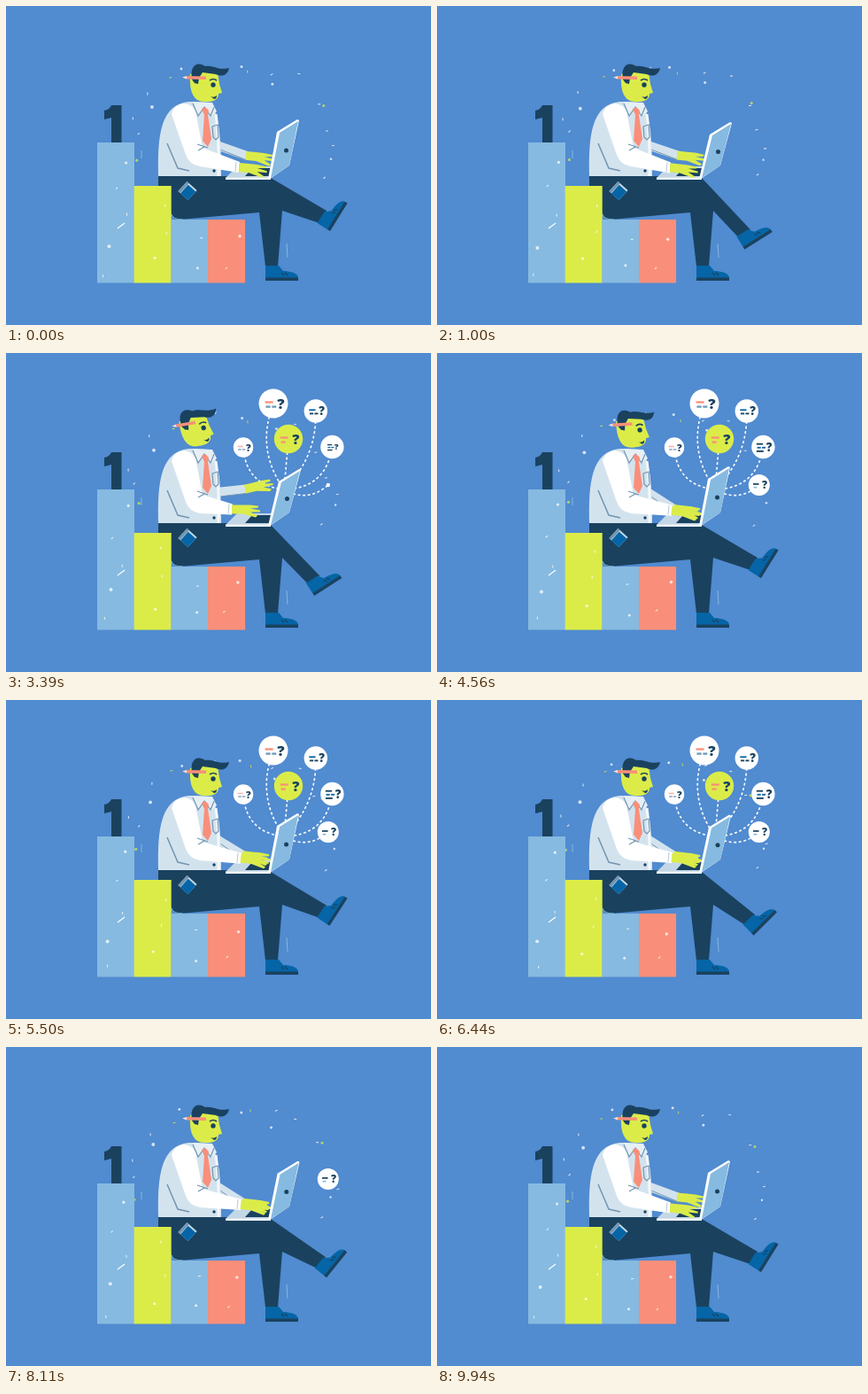
These frames come from a looping animation (480 px wide and 360 px high, 9990 ms). An HTML page with a canvas:

```html
<!DOCTYPE html>
<html>
<head>
<meta charset="utf-8">
<style>
html, body { margin: 0; width: 100%; height: 100%; overflow: hidden; background: #518bd0 }
canvas { display: block }
</style>
</head>
<body>
<canvas id="stage" width="480" height="360"></canvas>
<script>
const g = document.getElementById('stage').getContext('2d');
const LOOP = 9.99, TAU = Math.PI * 2;
const BG = '#518bd0', NAVY = '#1a425f', SKY = '#86bae0', LIME = '#dbec49', CORAL = '#f98f7a',
  SHIRT = '#d3e3ee', SHOE = '#0565a6', FOLD = '#7395b0', WHITE = '#fff';

const clamp = v => Math.max(0, Math.min(1, v));
const mix = (a, b, p) => a + (b - a) * p;
const ease = p => p * p * (3 - 2 * p);
const span = (t, start, length) => clamp((t - start) / length);
const pulse = (t, on, off, length) => ease(span(t, on, length)) - ease(span(t, off, length));
const backOut = p => 1 + 2.7 * (p - 1) ** 3 + 1.7 * (p - 1) ** 2;
const noise = n => (Math.sin(n * 127.1 + 3) * 43758.5 % 1 + 1) % 1;

function fill(d, color) {
  g.fillStyle = color;
  g.fill(new Path2D(d));
}
function stroke(d, color, width) {
  g.strokeStyle = color;
  g.lineWidth = width;
  g.stroke(new Path2D(d));
}
function disc(x, y, r, color) {
  g.fillStyle = color;
  g.beginPath();
  g.arc(x, y, r, 0, TAU);
  g.fill();
}
function rect(x, y, w, h, color) {
  g.fillStyle = color;
  g.fillRect(x, y, w, h);
}
function placed(x, y, degrees, draw, scale = 1) {
  g.save();
  g.translate(x, y);
  g.rotate(degrees * Math.PI / 180);
  g.scale(scale, scale);
  draw();
  g.restore();
}

const HUB = { x: 314, y: 154 };
const bubbles = [
  { x: 268, y: 106.5, r: 11.2, bend: -.42, top: '#f5b5a8', low: '#86a8c8' },
  { x: 302, y: 57, r: 16.5, bend: -.27, top: CORAL, low: '#6c9cba' },
  { x: 319, y: 97, r: 16.2, bend: 0, top: CORAL, low: CORAL, back: LIME, single: true },
  { x: 349.8, y: 65.5, r: 13.2, bend: .22, top: SHOE, low: NAVY },
  { x: 368.4, y: 106, r: 13.2, bend: .42, top: NAVY, low: SHOE, third: true },
  { x: 363.8, y: 149, r: 12, bend: .36, top: NAVY, low: SKY, single: true },
];

function bubbleContent({ r, top, low, single, third }) {
  const h = r * .14, lift = third ? -.16 : 0;
  const bar = (x, y, w, c) => rect(x * r, y * r - h / 2, w * r, h, c);
  bar(-.57, -.09 + lift, .55, top);
  bar(-.52, .22 + lift, .32, low);
  if (!single) bar(-.1, .22 + lift, .3, low);
  if (third) bar(-.57, .37, .6, top);
  g.fillStyle = NAVY;
  g.font = `800 ${r}px "Open Sans", "Noto Sans", sans-serif`;
  g.textAlign = 'center';
  g.fillText('?', r * .51, r * .36);
}

// Each line grows out of the laptop, pops its bubble, and both leave again in the same order
function drawBubble(b, i, t) {
  const start = 1.55 + .28 * i, leave = 6.94 + .2 * i;
  const reach = ease(span(t, start, .42)) * (1 - span(t, leave, .18));
  if (reach > 0) {
    const cx = mix(HUB.x, b.x, .5) - (b.y - HUB.y) * b.bend;
    const cy = mix(HUB.y, b.y, .5) + (b.x - HUB.x) * b.bend;
    const mx = mix(HUB.x, cx, reach), my = mix(HUB.y, cy, reach);
    const ex = mix(mx, mix(cx, b.x, reach), reach), ey = mix(my, mix(cy, b.y, reach), reach);
    g.setLineDash([3, 2.6]);
    stroke(`M${HUB.x},${HUB.y}Q${mx},${my} ${ex},${ey}`, WHITE, 1.6);
    g.setLineDash([]);
    if (reach > .9 && t < start + .6) disc(ex, ey, 2.2, WHITE);
  }
  const exit = span(t, leave + .18, .16);
  const size = backOut(span(t, start + .44, .25)) * (1 + .8 * exit - 1.8 * exit * exit);
  if (t < start + .44 || size <= 0) return;
  placed(b.x, b.y, 0, () => {
    disc(0, 0, b.r, b.back || WHITE);
    const content = span(t, start + .68, .2);
    if (content) placed(0, 0, 0, () => bubbleContent(b), backOut(content));
  }, size);
}

function drawShoe() {
  fill('M0,-17H15L20,-11Q37,-10 37,-3H0Z', SHOE);
  fill('M0,-3.5H37V0H0Z', NAVY);
  stroke('M18,-9L21,-6M22,-9L25,-6', NAVY, 1.2);
}

function drawLegs(angle) {
  fill('M172,192H298L312,231L307,294H293L286,233L196,241Q187,241 186,232L172,206Z', NAVY);
  const a = angle * Math.PI / 180, px = 312, py = 224;
  const turn = (x, y) => [
    px + (x - px) * Math.cos(a) - (y - py) * Math.sin(a),
    py + (x - px) * Math.sin(a) + (y - py) * Math.cos(a)];
  fill(`M280,194H299L${turn(362, 231)}L${turn(354, 245)}L312,231L286,233Z`, NAVY);
  placed(...turn(366, 254), angle - 58, drawShoe);
  placed(293, 310, 0, drawShoe);
  stroke('M187,235Q188,241 200,241', SKY, 1);
  placed(205, 208.5, 42, () => {
    rect(-7.5, -7.5, 15, 15, '#c6d8e5');
    rect(-4, -5.5, 11.5, 13, SHOE);
    rect(-7.5, -7.5, 3, 15, FOLD);
  });
}

function drawHand(x, y, angle) {
  placed(x, y, angle, () =>
    fill('M-1,-5L10,-5L19,-5L29,-4V-2L20,-1L31,1V3L20,3L28,7L26,9L11,5L-1,5Z', LIME));
}

function drawTorso() {
  fill('M172,192C171,150 173,108 210,108L229,109C241,118 243,150 243,192Z', SHIRT);
  stroke('M237,122Q241,150 240,192', '#f4f8fb', 3);
  fill('M211,108L233,109L238,119L231,125L224,115L216,124Z', '#e6eff5');
  stroke('M211,110L217,124L224,114L231,124L235,114', FOLD, 1.2);
  fill('M221,116L225,114L229,118L228,123L232,150L228,159L222,152L224,123Z', CORAL);
  stroke('M233,136L239,134L240,148L237,151L234,148Z', FOLD, 1.2);
  disc(235, 168, 1.7, NAVY);
  disc(235, 186, 1.7, NAVY);
}

function drawNearArm(x, y, angle) {
  fill(`M187,122C190,108 208,106 214,119L222,160L${x},${y - 6}L${x - 1},${y + 6}L219,181Q207,179 203,168Z`, WHITE);
  stroke('M182,155L194,183L207,186', FOLD, 1.5);
  stroke('M216,156L228,160M217,163L224,159', FOLD, 1.2);
  stroke(`M${x - 4},${y - 6}L${x - 5},${y + 5}`, '#b5c9da', 1);
  drawHand(x, y, angle);
}

function drawHead() {
  fill('M208,77Q206,108 224,108Q240,109 240,99L244,98L241,88L239,75L225,70Z', LIME);
  fill('M210,83C207,66 217,62 225,68C233,66 241,73 252,70C250,79 243,80 237,77L222,75L218,81L217,88L213,87Z', NAVY);
  disc(234, 89, 2.7, NAVY);
  stroke('M230,84Q234,81 238,84', NAVY, 1.6);
  fill('M231,102Q235,104 238,101Q238,105 235,105Z', NAVY);
  fill('M204,79L226,79.5V83L204,82.5Z', CORAL);
  fill('M204,79L199,80.5L204,82.5Z', '#f5e3d3');
}

function drawLaptopBase() {
  fill('M248,194L261,181H304L299,195Z', '#c3d7e6');
  fill('M270,192L278,183H301L297,192Z', NAVY);
  fill('M248,193.5H299V196H248Z', '#eef4f8');
}

function drawLid(sag) {
  const x = 2 * sag, y = 3 * sag;
  fill(`M296,195L${306 + x},${142 + y}L${329 + x},${128 + y}L${331 + x},${129 + y}L320,180L298,195Z`, WHITE);
  fill(`M299,194L${309 + x},${143 + y}L${330 + x},${130 + y}L320,180Z`, SKY);
  disc(316.5 + x / 2, 163 + y / 2, 2.5, NAVY);
}

function drawSpeck(x, y, seed, color, t) {
  const w = t / LOOP * TAU * (1 + seed % 2);
  const dx = x + 3 * Math.sin(w + seed), dy = y + 3 * Math.cos(w + seed * 1.7);
  g.globalAlpha = .75;
  if (seed % 3) placed(dx, dy, noise(seed) * 180, () => stroke('M-1.5,0H1.5', color, 1.1));
  else disc(dx, dy, 1 + noise(seed + .5), color);
  g.globalAlpha = 1;
}

// Specks scattered over an arch around the figure
function drawSkySpecks(t) {
  for (let i = 0; i < 20; i++) {
    const a = Math.PI * mix(.95, 2.12, (i + noise(i)) / 20), far = mix(.78, 1, noise(i + 40));
    drawSpeck(255 + 122 * far * Math.cos(a), 160 + 105 * far * Math.sin(a), i, i % 5 ? WHITE : LIME, t);
  }
  stroke('M153,163V172M317,268L318,284', SKY, 1);
}

function drawBars(t) {
  [154, 203, 241, 241].forEach((top, i) => {
    const x = 103 + 41.7 * i;
    rect(x, top, 42, 312.5 - top, [SKY, LIME, SKY, CORAL][i]);
    for (let y = top + 20, n = i * 7; y < 305; y += 32, n++)
      drawSpeck(x + 7 + 28 * noise(n + 9), y, n, WHITE, t);
  });
  stroke('M126,251L134,245', WHITE, 1.2);
  fill('M119,112H130.5V154H119V126L111,128V118Q117,117 119,112Z', NAVY);
}

function draw(t) {
  const swing = pulse(t % (LOOP / 4), .45, 1.2, .5);
  const look = pulse(t, 1.3, 4.36, .38);
  const lift = pulse(t, 2.4, 3.6, .7);
  const rest = 1 - pulse(t, 1.2, 9, .55);
  const tap = Math.sin(t / LOOP * TAU * 24) * .7;

  rect(0, 0, 480, 360, BG);
  drawSkySpecks(t);
  bubbles.forEach((b, i) => drawBubble(b, i, t));
  drawLegs(26 * swing);
  drawBars(t);
  drawLaptopBase();

  const farX = 268 + 3 * lift + 4 * rest, farY = 176 - 22 * lift - 7 * rest - tap;
  stroke(`M238,157L${farX},${farY}`, SHIRT, 10);
  stroke(`M242,162L${farX},${farY + 5}`, FOLD, 1);
  drawHand(farX, farY, 6 - 20 * lift);
  drawTorso();
  placed(mix(226, 215.5, look), mix(90, 87, look), -11 * look, () => {
    g.translate(-226, -90);
    drawHead();
  });
  drawNearArm(266 - 10 * lift - 2 * rest, 178 - 2 * lift + 4 * rest + tap, 6 - 6 * lift);
  drawLid(swing);
}

function frame() {
  draw(performance.now() / 1000 % LOOP);
  requestAnimationFrame(frame);
}
frame();
</script>
</body>
</html>
```
